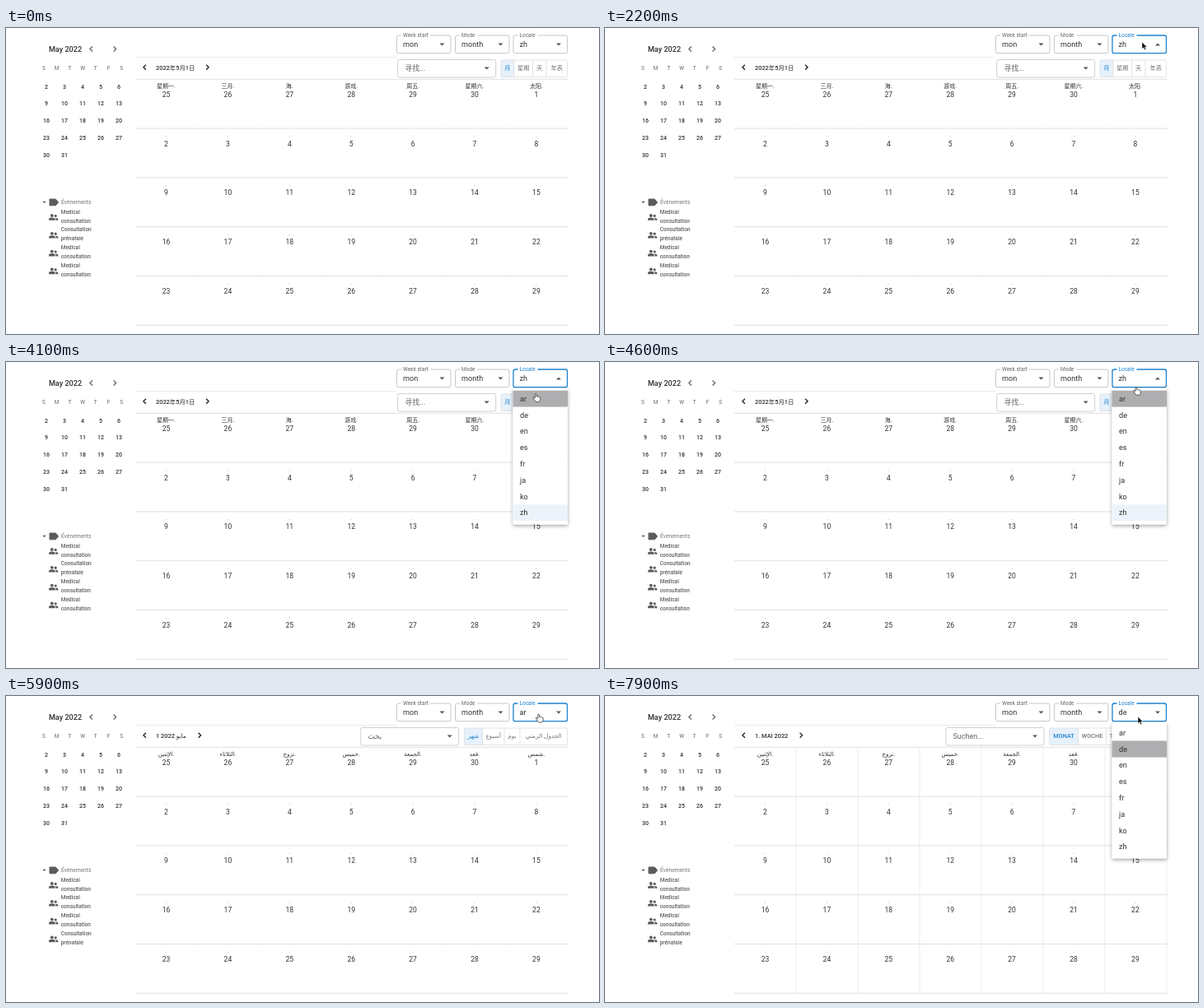
Recreate the animation shown at these times as an HTML page. Size 720x372 px, loop 8000 ms.

```html
<!DOCTYPE html>
<html lang="en">
<head>
<meta charset="utf-8">
<title>Calendar locale</title>
<style>
html, body { margin: 0; width: 100%; height: 100%; overflow: hidden; background: #fff; }
svg { display: block; width: 720px; height: 372px; }
text { font-family: Roboto, "Noto Sans", "Noto Sans CJK SC", "Noto Sans CJK", "DejaVu Sans", sans-serif; white-space: pre; }
</style>
</head>
<body>
<svg id="stage" viewBox="0 0 720 372"></svg>
<script>
const LOOP = 8000, INK = '#303030', GREY = '#666', BLUE = '#1c82d0';
const stage = document.getElementById('stage');

// Markup helpers; text y is the middle of the digits.
const text = (s, x, y, size, o = {}) =>
  `<text x="${x}" y="${(y + size * 0.36).toFixed(2)}" font-size="${size}" fill="${o.fill || INK}"
    font-weight="${o.weight || 400}" text-anchor="${o.anchor || 'middle'}">${s}</text>`;
const left = (s, x, y, size, o = {}) => text(s, x, y, size, { ...o, anchor: 'start' });
const rect = (x, y, w, h, fill, extra = '') =>
  `<rect x="${x}" y="${y}" width="${w}" height="${h}" fill="${fill}" ${extra}/>`;
const path = (d, extra) => `<path d="${d}" ${extra}/>`;
const line = (x1, y1, x2, y2, color, w = 0.8) =>
  path(`M${x1} ${y1}L${x2} ${y2}`, `stroke="${color}" stroke-width="${w}"`);
const group = (id, body, extra = '') => `<g id="${id}" ${extra}>${body}</g>`;
const caret = (x, y, id = '') => path(`M${x - 3} ${y - 1.4}h6l-3 3z`, `id="${id}" fill="#555"`);
const chevron = (x, y, dir, color) =>
  path(`M${x - dir * 1.4} ${y - 3}l${dir * 3} 3l${-dir * 3} 3`, `fill="none" stroke="${color}" stroke-width="1.3"`);

function sidebar() {
  let s = text('May 2022', 72, 25.5, 9.1, { weight: 500 }) + chevron(103.5, 25.5, -1, GREY) + chevron(132, 25.5, 1, GREY);
  [...'SMTWTFS'].forEach((d, i) => s += text(d, 46 + i * 15.7, 48.5, 6.5, { fill: GREY }));
  for (let r = 0; r < 5; r++)
    for (let c = 0; c < 5; c++) {
      const day = 2 + r * 7 + c;
      if (day < 32) s += text(day, 49 + c * 22, 71 + r * 20.8, 7, { weight: 500 });
    }
  s += path('M44.3 210.8h4.4l-2.2 2.3z', 'fill="#555"');
  s += path('M53 208h7.2l3.4 3.9l-3.4 3.9h-7.2z', 'fill="#5c5c5c" stroke="#5c5c5c" stroke-linejoin="round"');
  s += left('Évènements', 67, 211.5, 6.7, { fill: '#777' });
  for (let i = 0; i < 4; i++) {
    const y = 229.8 + i * 21.8;
    s += `<g fill="#5c5c5c"><circle cx="55.8" cy="${y - 1.8}" r="1.9"/><circle cx="60.2" cy="${y - 1.4}" r="1.6"/>` +
      path(`M52 ${y + 4}v-1.4q0-2 3.8-2t3.8 2v1.4zM60.4 ${y + 4}v-1.6l-.6-1.3q3.6-.2 3.6 1.6v1.3z`, '') + '</g>';
  }
  return s;
}

function events(second) {
  return [0, 1, 2, 3].map(i => {
    const words = i === second ? ['Consultation', 'prénatale'] : ['Medical', 'consultation'];
    return words.map((w, k) => left(w, 66.7, 223.3 + i * 21.8 + k * 11, 6.5, { weight: 500, fill: '#606060' })).join('');
  }).join('');
}

function grid() {
  let s = line(157, 35.5, 474, 35.5, '#e6e6e6');
  for (let r = 0; r < 6; r++) s += line(157, 62.3 + r * 59.8, 683, 62.3 + r * 59.8, '#d8d8d8');
  let cols = '';
  for (let c = 1; c < 8; c++) cols += line(157 + c * 75, 62, 157 + c * 75, 361, '#e4e4e4', 0.7);
  s += group('cols', cols);
  for (let r = 0; r < 5; r++)
    for (let c = 0; c < 7; c++) {
      const n = 25 + r * 7 + c, x = 194.5 + c * 74.9;
      s += text(n > 60 ? n - 30 : n > 30 ? n - 30 : n, x, 80.8 + r * 59.8, 8.5);
      if (r) s += text('-', x, 71.8 + r * 59.8, 5, { fill: '#888' });
    }
  return s;
}

const weekdays = names => names.split(' ')
  .map((n, i) => text(n, 194.5 + i * 74.9, 70.3, 7)).join('');

function toolbar(id, { date, next, box, hint, tabs }) {
  let s = chevron(168.5, 47.8, -1, '#222') + left(date, 182, 48, 7.4, { weight: 500 }) + chevron(next, 47.8, 1, '#222');
  s += rect(box, 38.5, 119, 21.5, '#fff', 'rx="2" stroke="#c4c4c4" stroke-width=".8"');
  s += left(hint, box + 8.5, 49, 9, { fill: '#666' }) + caret(box + 108, 49);
  const start = tabs[0][1], end = 681.5;
  s += rect(start, 39, tabs[1][1] - start, 20.5, '#e6f1fb');
  s += rect(start, 39, end - start, 20.5, 'none', 'rx="2" stroke="#dcdcdc" stroke-width=".8"');
  tabs.forEach(([name, x], i) => {
    const stop = i + 1 < tabs.length ? tabs[i + 1][1] : end;
    if (i) s += line(x, 39, x, 59.5, '#dcdcdc');
    s += text(name, (x + stop) / 2, 48.8, 7.3, { fill: i ? '#757575' : BLUE, weight: 500 });
  });
  return group(id, s);
}

function select(x, label, gap, value, ids = {}) {
  return rect(x + 0.5, 9, 65.5, 21.7, '#fff', `id="${ids.box || ''}" rx="2.2" stroke="#c0c0c0" stroke-width=".9"`) +
    rect(x + 6, 7, gap, 4, '#fff') +
    group(ids.label || '', left(label, x + 8, 8.8, 6.5, { fill: 'inherit' }), 'fill="#666"') +
    group(ids.value || '', left(value, x + 8, 20, 9.1)) + caret(x + 55.5, 20, ids.arrow);
}

const CODES = ['ar', 'de', 'en', 'es', 'fr', 'ja', 'ko', 'zh'];
const rowTop = i => 34.8 + i * 19.8;

function menu() {
  return rect(615.5, 32, 66.5, 165.5, '#fff', 'rx="2" filter="url(#shadow)"') +
    rect(615.5, 0, 66.5, 19.8, '#ecf3fb', 'id="picked"') +
    rect(615.5, 0, 66.5, 19.8, '#eee', 'id="hover"') +
    '<g clip-path="url(#row)"><circle id="ripple" fill="#aeaeb0"/></g>' +
    CODES.map((c, i) => left(c, 624, rowTop(i) + 9.8, 9.1)).join('');
}

stage.innerHTML = `<defs>
  <filter id="shadow" x="-20%" y="-10%" width="140%" height="120%">
    <feDropShadow dx="0" dy="1.8" stdDeviation="2.2" flood-opacity=".36"/></filter>
  <clipPath id="row">${rect(615.5, 0, 66.5, 19.8, '#000', 'id="rowClip"')}</clipPath></defs>` +
  rect(0, 0, 720, 372, '#fff') + sidebar() + group('eventsA', events(1)) + group('eventsB', events(3)) + grid() +
  group('daysZh', weekdays('星期一. 三月. 海. 游戏. 周五. 星期六. 太阳.')) +
  group('daysAr', weekdays('الإثنين. الثلاثاء. تزوج. خميس. الجمعة. قعد. شمس.')) +
  toolbar('zh', { date: '2022年5月1日', next: 244.5, box: 475.7, hint: '寻找...',
    tabs: [['月', 601], ['星期', 617], ['天', 639.5], ['年表', 656]] }) +
  toolbar('ar', { date: '1 مايو 2022', next: 235, box: 430.7, hint: 'بحث',
    tabs: [['شهر', 556.5], ['أسبوع', 578.5], ['يوم', 605], ['الجدول الزمني', 624]] }) +
  toolbar('de', { date: '1. MAI 2022', next: 238, box: 414, hint: 'Suchen...',
    tabs: [['MONAT', 539.5], ['WOCHE', 574.5], ['TAG', 608.5], ['ZEITLEISTE', 631]] }) +
  select(474, 'Week start', 35, 'mon') + select(545, 'Mode', 21, 'month') +
  select(615.5, 'Locale', 24, 'zh', { box: 'box', label: 'label', value: 'value', arrow: 'arrow' }) +
  group('menu', menu()) +
  group('pointer', path('M0 0V8.6L2 6.8L3.3 9.8L4.8 9.1L3.5 6.3H6.1Z', 'fill="#111" stroke="#fff" stroke-width=".5"')) +
  group('hand', path('M-2.2-4.4q.9-1.2 1.8 0v2.8q1.2-.6 1.8.3q1.2-.4 1.6.5q1.2-.2 1.2 1v2q0 2.8-2.4 2.8h-2.2q-1.2 0-2-1.5l-2.3-3.5q.3-1.3 1.5-.5l1 .9z',
    'fill="#fff" stroke="#333" stroke-width=".8" stroke-linejoin="round"'));

const el = {};
stage.querySelectorAll('[id]').forEach(n => { if (n.id) el[n.id] = n; });
const valueText = el.value.firstElementChild;
const show = (id, on) => el[id].setAttribute('display', on ? 'inline' : 'none');
const set = (id, attrs) => { for (const k in attrs) el[id].setAttribute(k, attrs[k]); };
const clamp = v => Math.min(1, Math.max(0, v));
const easeOut = v => 1 - (1 - clamp(v)) ** 2;

// Cursor stops: time, x, y
const STOPS = [[800, 636, 130], [1000, 640, 82], [1400, 652, 17], [2300, 652, 17], [2750, 646.5, 37],
  [3100, 646.5, 37], [3500, 644.5, 43.5], [4200, 644.5, 43.5], [5000, 648, 27], [6200, 648, 27],
  [6450, 641.5, 62], [7400, 641.5, 62], [7850, 647, 25]];

function cursorAt(t) {
  let i = 0;
  while (i < STOPS.length - 2 && t >= STOPS[i + 1][0]) i++;
  const [a, b] = [STOPS[i], STOPS[i + 1]];
  const p = clamp((t - a[0]) / (b[0] - a[0])), k = p * p * (3 - 2 * p);
  return [a[1] + (b[1] - a[1]) * k, a[2] + (b[2] - a[2]) * k];
}

// How far the menu is unfolded
function openness(t) {
  if (t < 5300) return easeOut((t - 2250) / 300);
  if (t < 6150) return 1 - clamp((t - 5300) / 400);
  return easeOut((t - 6150) / 250);
}

function draw(t) {
  const locale = t < 5250 ? 'zh' : t < 7800 ? 'ar' : 'de';
  const value = t < 5250 ? (t < 5150 ? 'zh' : 'ar') : locale;
  ['zh', 'ar', 'de'].forEach(l => show(l, l === locale));
  show('daysZh', locale === 'zh');
  show('daysAr', locale !== 'zh');
  show('eventsA', locale === 'zh');
  show('eventsB', locale !== 'zh');
  set('cols', { opacity: t < 7100 ? 0.15 : 1 });

  const focus = t >= 2150, over = t >= 1350;
  const up = focus && t < 7800 && !(t >= 5500 && t < 6150);
  set('box', { stroke: focus ? BLUE : over ? '#333' : '#c0c0c0', 'stroke-width': focus ? 1.3 : 0.9 });
  el.label.firstElementChild.setAttribute('fill', focus ? BLUE : GREY);
  valueText.textContent = value;
  set('arrow', { transform: up ? 'rotate(180 671 20)' : '' });

  const o = openness(t);
  show('menu', o > 0);
  set('menu', {
    opacity: t > 5300 && t < 6150 ? o * o * 0.75 : o,
    transform: `translate(648.75 31) scale(${0.75 + 0.25 * o} ${0.5625 + 0.4375 * o}) translate(-648.75 -31)`
  });
  const second = t >= 6150;
  const press = second ? 6380 : 3800, row = second ? 1 : 0;
  const hovered = second ? t > 6400 : t > 3100 && t < 5250;
  set('picked', { y: rowTop(t < 5250 ? 7 : t < 7800 ? 0 : 1) });
  set('hover', { y: rowTop(row) });
  show('hover', hovered);
  set('rowClip', { y: rowTop(row) });
  set('ripple', {
    cx: second ? 641 : 644, cy: rowTop(row) + 6,
    r: hovered ? 46 * easeOut((t - press) / 350) : 0
  });

  const [x, y] = cursorAt(t), hand = t >= 3100 && t < 7700;
  show('pointer', t >= 800 && !hand);
  show('hand', hand);
  set(hand ? 'hand' : 'pointer', { transform: `translate(${x} ${y})` });
}

function tick() {
  draw(performance.now() % LOOP);
  requestAnimationFrame(tick);
}
tick();
</script>
</body>
</html>
```
